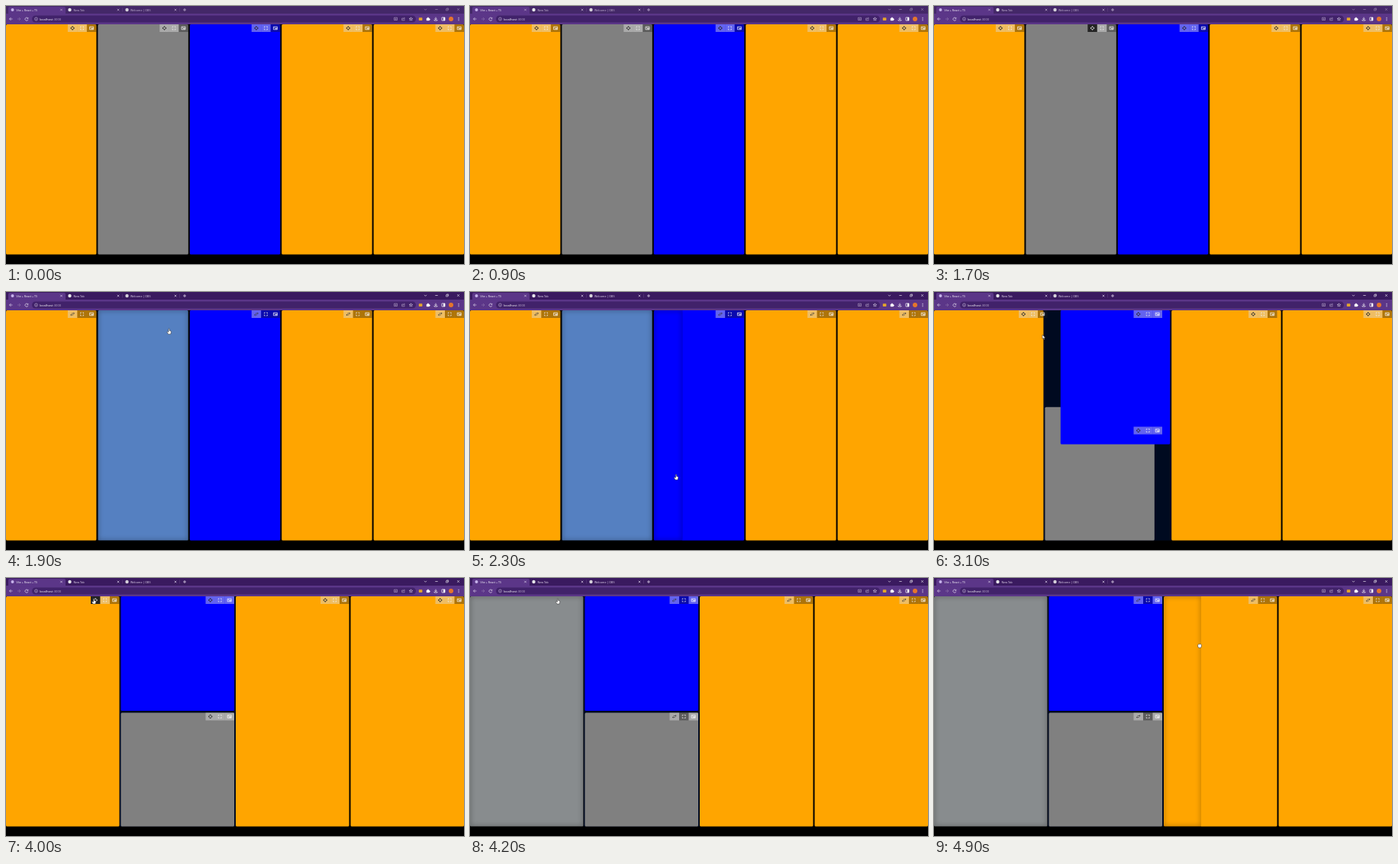
These frames come from a looping animation (600 by 338 pixels, 5000 ms). An HTML page with a canvas:

```html
<!DOCTYPE html>
<html lang="en">
<head>
<meta charset="utf-8">
<title>Tiling panes</title>
<style>
html, body { margin: 0; width: 100%; height: 100%; overflow: hidden; background: #000; }
canvas { display: block; width: 600px; height: 338px; }
</style>
</head>
<body>
<canvas id="stage" width="600" height="338"></canvas>
<script>
const c = document.getElementById('stage').getContext('2d');
const ORANGE = '#ffa500', GRAY = '#808080', BLUE = '#0000ff', NAVY = '#000a20';
const ACTIVATE = 1800, GRAB1 = 1900, DROP = 2800, GRAB2 = 4200;

// Panes as [x, y, w, h] before and after the drop
const column = (i, w) => [i * (w + 2), 24, w, 301.5];
const before = [0, 1, 2, 3, 4].map(i => column(i, 118.4));
const after = [
  column(0, 148.5), [150.5, 176.5, 148.5, 149], [150.5, 24, 148.5, 150],
  column(2, 148.5), column(3, 148.5)
];
for (const set of [before, after])
  for (const p of set) p[0] *= 600 / (set === before ? 600 : 600);
const colors = [ORANGE, GRAY, BLUE, ORANGE, ORANGE];

// Pointer stops: time, x, y
const stops = [
  [1800, 207, 29], [2300, 270, 242], [2800, 293, 269], [2900, 293, 269],
  [3100, 142, 58], [3600, 115, 30], [4200, 115, 30], [4900, 348, 88]
];

const clamp = v => Math.max(0, Math.min(1, v));
const smooth = v => (v = clamp(v), v * v * (3 - 2 * v));
const mix = (a, b, k) => a + (b - a) * k;

function rect(x, y, w, h, fill, r = 0) {
  c.fillStyle = fill;
  c.beginPath();
  c.roundRect(x, y, w, h, r);
  c.fill();
}

function disc(x, y, r, fill) {
  c.fillStyle = fill;
  c.beginPath();
  c.arc(x, y, r, 0, 7);
  c.fill();
}

// Strokes an SVG path moved to x, y; fills it too when asked
function path(x, y, d, stroke, width = .6, fill) {
  const p = new Path2D(d);
  c.save();
  c.translate(x, y);
  c.lineWidth = width;
  c.strokeStyle = stroke;
  c.lineJoin = 'round';
  if (fill) { c.fillStyle = fill; c.fill(p); }
  c.stroke(p);
  c.restore();
}

function text(s, x, y, size, fill) {
  c.font = size + 'px "Open Sans", "Noto Sans", sans-serif';
  c.fillStyle = fill;
  c.fillText(s, x, y);
  return x + c.measureText(s).width;
}

function innerShadow(x, y, w, h) {
  c.save();
  c.beginPath();
  c.rect(x, y, w, h);
  c.clip();
  c.shadowBlur = 6;
  c.shadowColor = 'rgba(0,0,0,.55)';
  c.strokeStyle = '#000';
  c.lineWidth = 2;
  c.strokeRect(x - 1, y - 1, w + 2, h + 2);
  c.restore();
}

const CROSS = 'M-1.3-1.3L1.3 1.3M1.3-1.3L-1.3 1.3';

function browser(active) {
  const strip = active ? '#3a1a5f' : '#442868';
  const dim = active ? '#fff' : '#a594b8';
  const soft = active ? '#e8def2' : '#cbbbd9';
  rect(0, 0, 600, 24, strip);
  rect(3, 1, 75, 12, '#5b3688', 2);
  rect(0, 10, 600, 14, '#5b3688');
  rect(34, 12.5, 503, 9, '#41226a', 4.5);

  disc(8.5, 5, 2, '#c5b2ea');
  disc(83.5, 5, 2.2, '#e6e6ea');
  disc(158.5, 5, 2.2, '#d5d0da');
  text('Vite + React + TS', 13.5, 6.6, 3.6, '#fff');
  text('New Tab', 88.5, 6.6, 3.6, soft);
  text('Welcome | OBS', 163, 6.6, 3.6, soft);
  for (const x of [72.5, 147, 222]) path(x, 5, CROSS, soft, .6);
  path(234, 5, 'M-2 0H2M0-2V2', soft, .7);
  path(152.5, 5, 'M0-2.5V2.5', '#6d4f8d', .4);
  path(227.5, 5, 'M0-2.5V2.5', '#6d4f8d', .4);

  path(549.5, 4.5, 'M-1.5-.7L0 .8L1.5-.7', dim);
  path(564, 4.5, 'M-1.7 0H1.7', dim);
  path(578, 4.5, 'M-1.5-.7H.7V1.5H-1.5ZM-.6-.8V-1.6H1.6V.6H.8', dim, .5);
  path(592.5, 4.5, CROSS, dim);

  path(6.5, 17, 'M2 0H-2M0-2L-2 0L0 2', '#e8def2');
  path(17, 17, 'M-2 0H2M0-2L2 0L0 2', '#9076ad');
  path(27, 17, 'M1.6-1A2 2 0 1 0 1.9 .7M1.9-2V-.6H.5', '#f4eefa');
  path(39.5, 17, 'M2 0A2 2 0 1 1-2 0A2 2 0 1 1 2 0M0-.2V1.1M0-1.1V-.7', '#d8cce6', .5);
  text(':3000', text('localhost', 44, 18.6, 4.2, '#fff'), 18.6, 4.2, '#b9a8cb');

  path(510.5, 17, 'M-2-1.8H2V1.5H-2ZM-.8 0H.8M0-.8V.8', '#cbbbd9', .5);
  path(520.5, 17, 'M0-1H-1.8V1.8H1.6V.5M-.8 .6Q-.4-1 1.8-1M.8-2L1.9-1L.8 0', '#cbbbd9', .5);
  path(530.5, 17, 'M0-2.2L.7-.7L2.2-.6L1 .4L1.4 2L0 1.1L-1.4 2L-1-.4L-2.2-.6L-.7-.7Z', '#f0e8f8', .5);
  rect(540.8, 15.3, 4.6, 3.6, '#e3a52c', .6);
  path(553, 17, 'M-2-1H-.7V-2H.5V-1H1.7V.1H2.4V1.1H1.7V2H-2Z', '#fff', .4, '#fff');
  path(563, 17, 'M0-2.3V.7M-1.4-.6L0 .8L1.4-.6M-2 1V2H2V1', '#fff', .7);
  path(573, 17, 'M-2-2H2V2H-2Z', '#fff', .7);
  rect(573, 15, 2, 4, '#fff');
  disc(583, 17, 3, '#e5752c');
  for (const y of [15.2, 17, 18.8]) disc(593, y, .55, '#fff');
}

const MOVE = 'M0-2.6L1-1.5H-1ZM0 2.6L1 1.5H-1ZM-2.6 0L-1.5-1V1ZM2.6 0L1.5-1V1Z';
const SWAP = 'M-2.4 1H1M-1.3 0L-2.4 1L-1.3 2M-1-1H2.4M1.3-2L2.4-1L1.3 0';
const EXPAND = 'M-2-.7V-2H-.7M.7-2H2V-.7M2 .7V2H.7M-.7 2H-2V.7';
const PICTURE = 'M-2.5-1.8H2.5V1.8H-2.5ZM0 0H1.7V1H0ZM-1.7-1L-.6 0';

function toolbar([px, py, pw], { dragging, hover, paired }) {
  const x = px + pw - 37.5, light = 'rgba(220,220,220,.45)', dark = 'rgba(30,30,30,.36)';
  const fills = [hover ? '#242424' : light, dragging ? dark : light, paired ? light : dark];
  fills.forEach((f, i) => rect(x + i * 12.5, py, 12.5, 10, f));
  const cy = py + 5;
  if (dragging) path(x + 6.2, cy, SWAP, '#303030', .6);
  else path(x + 6.2, cy, MOVE, hover ? '#ddd' : '#282828', .5, hover ? '#ddd' : '#282828');
  path(x + 18.7, cy, EXPAND, '#f3f3f3', .7);
  path(x + 31.2, cy, PICTURE, '#fff', .7);
}

const ARROW = 'M0 0V5.4L1.3 4.2L2.2 6.2L3.1 5.8L2.2 3.9H3.9Z';
const HAND = 'M-.6-2.8Q0-3.6.6-2.8V-.6L2.4 0Q3 .4 2.8 1.4L2.2 4H-1L-2.6 1.4Q-2.6.3-1.4.9L-.6 1.4Z';
const FIST = 'M-2-.6Q-1.6-1.8-.8-1.2Q0-2 .8-1.2Q1.8-1.8 2.2-.7L2.5 1L1.6 3.4H-1.4L-2.6 1Z';

function pointer(t) {
  if (t < ACTIVATE) return;
  let i = 0;
  while (i < stops.length - 2 && t > stops[i + 1][0]) i++;
  const [a, b] = [stops[i], stops[i + 1]], k = smooth((t - a[0]) / (b[0] - a[0]));
  const x = mix(a[1], b[1], k), y = mix(a[2], b[2], k);
  if (t >= DROP && t < 3600) path(x, y - 2, ARROW, '#222', .5, '#fff');
  else path(x, y, t > GRAB2 + 300 ? FIST : HAND, '#222', .5, '#fff');
}

function draw(t) {
  const dropped = t >= DROP;
  const held = t >= GRAB2 ? 0 : t >= GRAB1 && !dropped ? 1 : -1;
  const k = smooth((t - 2837) / 356);
  const panes = before.map((p, i) => p.map((v, j) => mix(v, after[i][j], k)));

  rect(0, 0, 600, 338, '#000');
  browser(t >= ACTIVATE);
  if (dropped) {
    const left = panes[0][2];
    rect(left, 24, panes[3][0] - left, 301.5, NAVY);
  }
  panes.forEach((p, i) => {
    const fill = i !== held ? colors[i] : i ? '#5580c1' : '#888c8e';
    rect(...p, fill, 1.5);
    if (i === held) innerShadow(...p);
  });

  // Where the held pane would land
  if (held === 1 && t >= 2200) {
    const [x, y, w, h] = panes[2];
    if (t < 2500) innerShadow(x, y, w * .315, h);
    else innerShadow(x, y + h * .67, w, h * .33);
  }
  if (held === 0 && t >= 4700) {
    const [x, y, w, h] = panes[3];
    innerShadow(x, y, w * .33, h);
  }

  (dropped ? after : before).forEach((p, i) => {
    if (i === held) return;
    toolbar(p, {
      dragging: held >= 0,
      hover: i === 1 && t >= 1500 && t < GRAB1 || i === 0 && t >= 3600 && t < GRAB2,
      paired: dropped && (i === 1 || i === 2)
    });
  });
  pointer(t);
}

function tick() {
  draw(Math.floor(performance.now() % 5000 / 100) * 100);
  requestAnimationFrame(tick);
}
tick();
</script>
</body>
</html>
```
